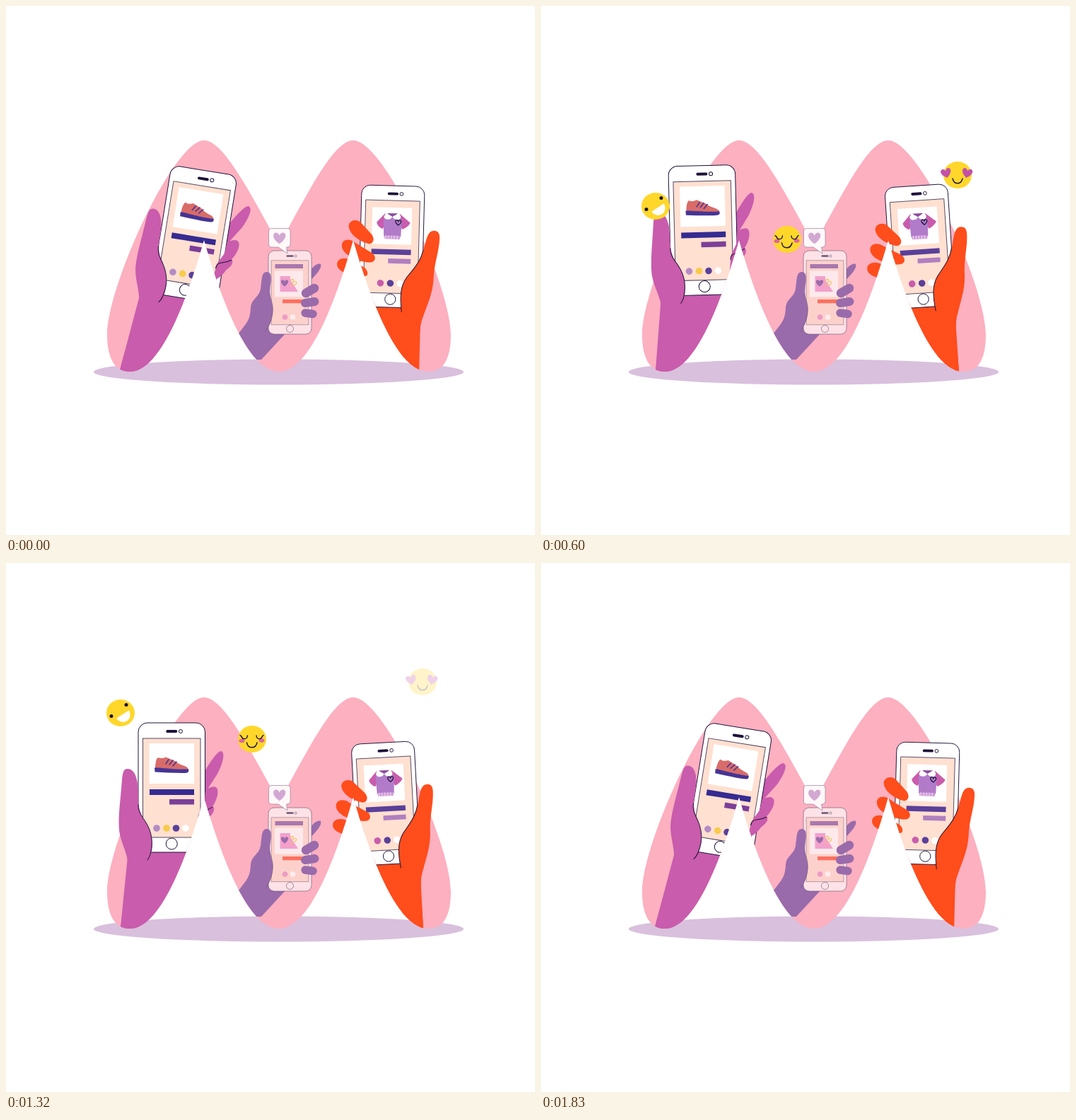
An HTML page for the animation above (1860 ms loop, 748 by 748 pixels).

```html
<!DOCTYPE html>
<html lang="en">
<head>
<meta charset="utf-8">
<title>Shopping on phones</title>
<style>
  html, body { margin: 0; width: 100%; height: 100%; overflow: hidden; background: #fff; }
  svg { display: block; width: 100vw; height: 100vh; }
</style>
</head>
<body>
<svg id="stage" viewBox="0 0 748 748"></svg>
<script>
const LOOP = 1860, STEP = 30;
const INK = '#1d1238', MAGENTA = '#c95cac', ORANGE = '#ff4d1c', PLUM = '#9a6bab';
const INDIGO = '#5a4099', YELLOW = '#ffd72b';

// ---- Drawing helpers ----
const rect = (x, y, w, h, fill, extra = '') =>
  `<rect x="${x}" y="${y}" width="${w}" height="${h}" fill="${fill}" ${extra}/>`;
const dot = (x, y, r, fill, extra = '') =>
  `<circle cx="${x}" cy="${y}" r="${r}" fill="${fill}" ${extra}/>`;
const oval = (x, y, rx, ry, fill) =>
  `<ellipse cx="${x}" cy="${y}" rx="${rx}" ry="${ry}" fill="${fill}"/>`;
const shape = (d, fill, extra = '') => `<path d="${d}" fill="${fill}" ${extra}/>`;
const line = (d, width = 1, color = INK) =>
  shape(d, 'none', `stroke="${color}" stroke-width="${width}" stroke-linecap="round"`);
const heart = (x, y, size, fill, turn = 0, extra = '') =>
  shape('M0 8C-13 -1 -9 -9 -4 -8Q-1 -7.5 0 -4Q1 -7.5 4 -8C9 -9 13 -1 0 8Z', fill,
    `transform="translate(${x} ${y}) rotate(${turn}) scale(${size})" ${extra}`);
const finger = (x1, y1, x2, y2, width, color) => line(`M${x1} ${y1}L${x2} ${y2}`, width, color);

function phone(x, y, w, h, k, body = '#fff', screen = '#ffe0d1', ink = INK) {
  const cx = x + w / 2, edge = `stroke="${ink}" stroke-width="${k}"`;
  return rect(x, y, w, h, body, `rx="${13 * k}" ${edge}`) +
    rect(cx - 8 * k, y + 10 * k, 16 * k, 4 * k, ink, `rx="${2 * k}"`) +
    dot(cx + 12.7 * k, y + 12 * k, 2.5 * k, 'none', edge) +
    rect(x + 6.5 * k, y + 22 * k, w - 13 * k, h - 43 * k, screen, `${edge} stroke-opacity=".75"`) +
    dot(cx, y + h - 12 * k, 8 * k, 'none', edge);
}

// ---- Backdrop ----
const underside = 'C629 500 618 517 597 517C550 517 511 400 491 331C471 400 433 517 386 517' +
  'C339 517 300 400 280 331C260 400 222 517 175 517C155 517 143 500 143 465';
const hills = `M629 465${underside}C143 396 237 190 280 190C308 190 346 266 386 338` +
  'C426 266 463 190 491 190C535 190 629 396 629 465Z';

// ---- Left: sneaker phone, drawn upright ----
const sneaker =
  shape('M211 291C211 284 212 277 215 275C219 277 222 276 226 274.500L239 280' +
    'C246 287 257 286 258 292Z', '#d96c69') +
  shape('M210 289.500C220 289 232 292 258 291.500C259 296 257 297 250 297C235 297 222 296 210.500 295.500Z', '#463494') +
  line('M226 284L230 278M231 285L236 279M236 287L241 281', 1.6, '#463494');

const leftSide =
  shape('M173 405H275V560H158L162 515Z', MAGENTA) +
  shape('M279 298C288 282 299 266 304 266C311 268 306 284 299 298L279 329Z', MAGENTA) +
  phone(187, 226, 94.5, 183, 1) +
  rect(202.5, 255, 63.5, 57, '#fff') + sneaker +
  rect(203, 320, 63, 8, '#352b91') + rect(231, 334, 35, 7.5, '#7b3f98') +
  dot(213, 375, 4.8, '#b58bc5') + dot(227, 375, 4.8, '#f8cb4c') +
  dot(240.5, 375, 4.8, INDIGO) + dot(254, 375, 4.8, '#fff') +
  shape('M282 321C288 317 296 313 299 320C301 328 296 340 289 348L272 360C272 350 279 344 281 336Z', MAGENTA) +
  shape('M272 360C273 350 281 352 293 344C296 350 292 355 287 360C282 370 277 375 270 378Z', MAGENTA) +
  line('M272 360C272 349 281 353 292 345') +
  shape('M172 291C163 291 165 303 162 330C160 350 159 365 160 378C162 395 172 410 173 428' +
    'C173 450 165 485 161 525L200 525L205 412C209 395 206 380 198 367C188 352 187 345 187 325' +
    'C187 308 183 291 172 291Z', MAGENTA) +
  line('M187 342C187 353 193 359 198 367C206 380 208 395 205 408Q204 415 200 420');

// ---- Right: sweater phone, drawn upright ----
const sweater =
  shape('M532 293.500L520.500 306Q521 312 529 315.500L536 303ZM553 293.500L568 306Q565 312 557 315.500L549 303Z', MAGENTA) +
  shape('M533 294H552L556 303L555 326H531L530 303Z', '#b17bc9') +
  rect(532, 324.5, 22, 5, '#cf9bd8', 'rx="1"') +
  line('M534 325v4M538 325v4M542 325v4M546 325v4M550 325v4', .7, '#fff') +
  shape('M535 293H550L542.500 299Z', '#8e4f9f') +
  shape('M534 293Q528 298 533 301.500Q540 303 542.500 298ZM551 293Q557 298 552 301.500Q545 303 542.500 298Z', '#fff') +
  heart(551, 306, .45, 'none', 0, `stroke="${INK}" stroke-width="2.8"`);

const rightSide =
  shape('M500 418H575L586 440V550H500Z', ORANGE) +
  phone(498, 254, 89, 172, .95) +
  rect(514, 285, 56, 52, '#fff') + sweater +
  rect(514, 344, 56, 7.3, INDIGO) + rect(538, 357, 32, 6.8, '#b07fc0') +
  dot(528, 392, 4.8, MAGENTA) + dot(542, 392, 4.8, INDIGO) + dot(555.5, 392, 4.8, '#fff') +
  shape('M481 312C482 304 492 302 498 307L514 324C519 331 516 337 510 337C500 335 482 326 481 312Z', ORANGE) +
  shape('M472 340C472 332 482 329 491 336L515 350C521 354 521 361 515 363C504 365 472 356 472 340Z', ORANGE) +
  shape('M466 367C466 359 476 356 486 361L505 371C511 376 511 383 505 383C495 385 466 380 466 367Z', ORANGE) +
  shape('M602 316C594 316 592 325 589 338C585 358 575 370 565 383C556 396 556 412 559 430' +
    'L555 550H586V515C586 480 583 455 590 437C597 415 602 405 603 385C603 362 610 345 610 326' +
    'C610 319 607 316 602 316Z', ORANGE) +
  line('M587 345C584 360 575 370 565 383C556 396 556 412 559 432');

// ---- Middle: still phone and speech bubble ----
const middle =
  shape('M372 440L345 442L329 463V500H361L398 460Z', PLUM) +
  shape('M428 378C433 368 441 363 445 365C447 370 440 379 430 388Z', PLUM) +
  phone(371, 346, 61, 118, .63, '#fde2e7', '#fdd1cb', '#6d5672') +
  rect(380.5, 365, 39.5, 6, '#a878ad') + rect(380, 374.5, 40, 37, '#fde9ec') +
  shape('M387.500 382H402Q401 388 406 393L413 404H387.500Z', '#f3a0cb') +
  heart(394, 392, .58, PLUM) +
  line('M402 389C404 384 409 387 405 391C411 387 413 392 408 394C404 396 403 394 402 396', 1.2, '#f3c45f') +
  rect(391, 415, 28.5, 5.3, '#fb705f') +
  dot(394.5, 440, 3.8, '#ee9bc5') + dot(405.5, 440, 3.8, '#fdebee') +
  finger(436, 399, 424, 406, 12.5, PLUM) +
  finger(436.5, 418, 423, 420, 12, PLUM) +
  finger(434, 435.5, 423, 434, 11.5, PLUM) +
  shape('M369 376C361 376 362 386 360 400C358 412 347 414 346 426C345 438 346 443 329 463' +
    'L364 464C374 452 379 438 377 424C374 412 372 406 374 394C376 384 375 376 369 376Z', PLUM) +
  line('M372 408C375 415 378 422 377 432Q376 447 367 460', .6, '#6d5672');

const bubble =
  shape('M376 314.500H398Q402 314.500 402 319V337Q402 341 398 341H396.500L398 350L385 341H376' +
    'Q371.500 341 371.500 337V319Q371.500 314.500 376 314.500Z', '#fff8f9',
    'stroke="#a58fa5" stroke-width=".8"') +
  heart(386.700, 328.500, .98, '#d2a8d3');

// ---- Faces, centred on the origin ----
const head = oval(0, 0, 20, 19, YELLOW);
const grin = head + dot(-13, 4.5, 2.5, INK) + dot(8, -11.5, 2.5, INK) +
  shape('M-10.500 0A10.500 11 0 0 0 10.500 0Z', '#fff', 'transform="translate(3 2) rotate(-33)"');
const loving = head + heart(-16, -2.5, .82, '#c350a9', -14) + heart(13.5, -2.5, .82, '#c350a9', 12) +
  line('M-7 5C-5 14 5 14 7 5', 1.4);
const blissful = head + oval(-14.5, 2.5, 4, 2.8, '#e0659f') + oval(13.5, 2, 4, 2.8, '#e0659f') +
  line('M-15 -4C-14 1 -7 1 -6.500 -5M-15 -3.500l-2 -2M6 -5C6.500 1 13 1 14.500 -4M14 -3.500l2 -2', 1.4) +
  line('M-7.500 5C-6 14 5 14 7 5', 1.5);

const group = (id, content) => `<g id="${id}">${content}</g>`;
document.getElementById('stage').innerHTML =
  `<defs><clipPath id="cut"><path d="M0 0H748V465H629${underside}H0Z"/></clipPath></defs>` +
  oval(385.5, 517.5, 261.5, 18, '#d9c0dd') + shape(hills, '#fcb0c0') +
  `<g clip-path="url(#cut)">${middle}${group('left', leftSide)}${group('right', rightSide)}</g>` +
  bubble + group('grin', grin) + group('blissful', blissful) + group('loving', loving);

// ---- Motion ----
// Smooth curve through [time, value] keys
function track(keys) {
  const slope = i => {
    const [t0, v0] = keys[Math.max(i - 1, 0)], [t1, v1] = keys[Math.min(i + 1, keys.length - 1)];
    return (v1 - v0) / (t1 - t0);
  };
  return t => {
    let i = 0;
    while (i < keys.length - 2 && t >= keys[i + 1][0]) i++;
    const [t0, v0] = keys[i], [t1, v1] = keys[i + 1], d = t1 - t0;
    const u = Math.min(Math.max((t - t0) / d, 0), 1), w = 1 - u;
    return v0 * w * w * (1 + 2 * u) + v1 * u * u * (3 - 2 * u) +
      d * u * w * (slope(i) * w - slope(i + 1) * u);
  };
}
const ramp = (t, from, to) => Math.min(Math.max((t - from) / (to - from), 0), 1);

const sway = track([[-270, 6.1], [0, 9.2], [300, 5.1], [600, -1.4], [920, -3.7],
  [1080, -3.1], [1320, 0], [1590, 6.1], [1850, 9.2], [2160, 5.1]]);

const faces = [
  { id: 'grin', x: 162, show: [210, 340], hide: [1380, 1500],
    y: track([[200, 307], [300, 302], [600, 283], [1080, 244], [1320, 212], [1500, 178]]) },
  { id: 'loving', x: 589, show: [80, 210], hide: [1230, 1350],
    y: track([[60, 270], [300, 260], [600, 239], [1080, 212], [1320, 168], [1360, 158]]) },
  { id: 'blissful', x: 348, show: [450, 570], hide: [1660, 1785],
    y: track([[440, 338], [600, 330], [1080, 285], [1320, 249], [1590, 182], [1780, 129]]) }
];
const node = id => document.getElementById(id);

function draw(t) {
  const angle = sway(t);
  node('left').setAttribute('transform', `rotate(${angle} 217 518)`);
  node('right').setAttribute('transform', `rotate(${(angle - 6.1) / 2} 540 443)`);
  for (const { id, x, y, show, hide } of faces) {
    node(id).setAttribute('transform', `translate(${x} ${y(t)})`);
    node(id).setAttribute('opacity', ramp(t, ...show) * (1 - ramp(t, ...hide)));
  }
}

const start = performance.now();
function tick() {
  const t = (performance.now() - start) % LOOP;
  draw(Math.floor(t / STEP) * STEP);
  requestAnimationFrame(tick);
}
tick();
</script>
</body>
</html>
```
